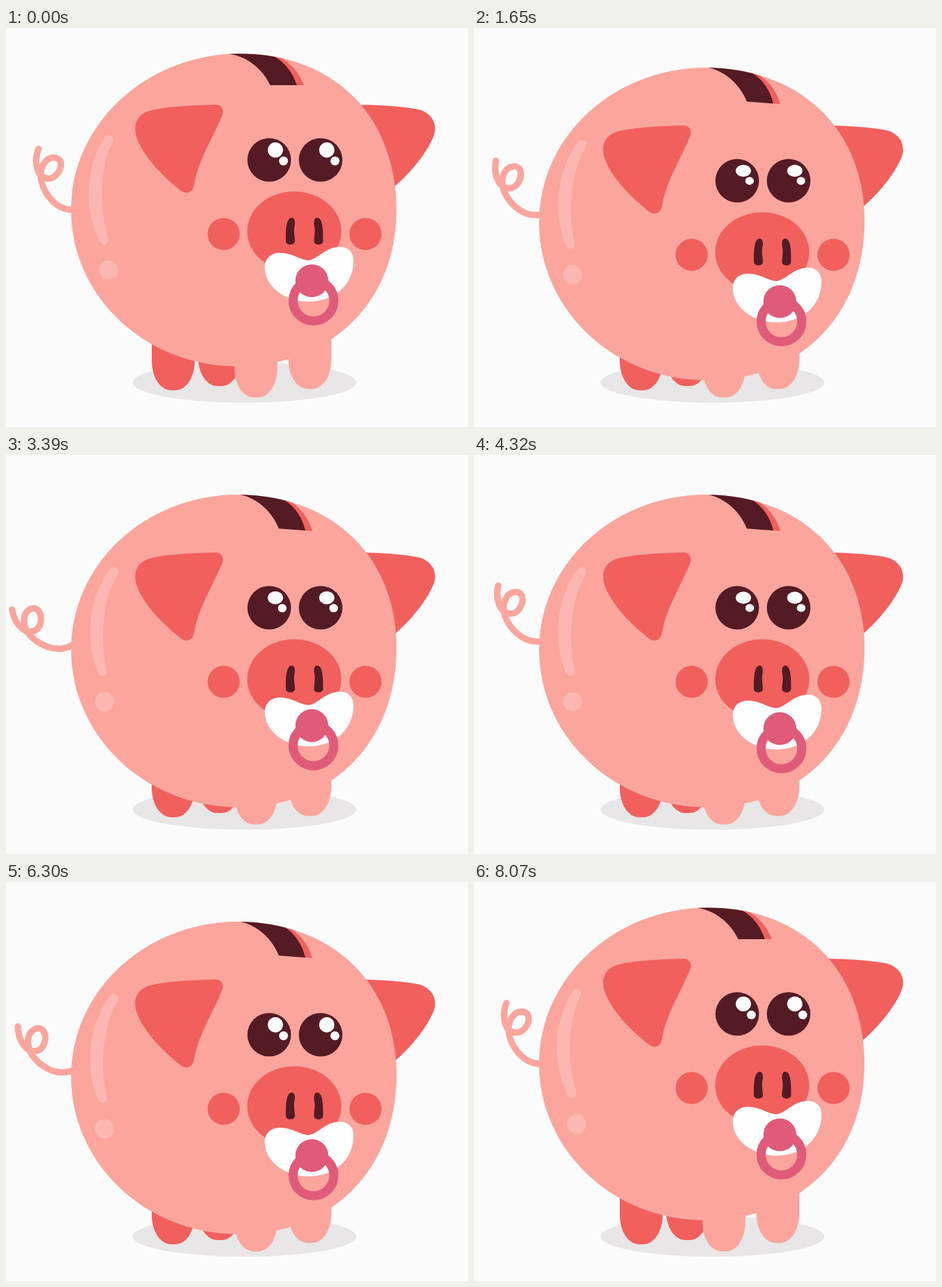
Recreate the animation shown at these times as an HTML page. Size 710 by 614 pixels, loop 8.1 s.

```html
<!DOCTYPE html>
<html lang="en">
<head>
<meta charset="utf-8">
<title>Piggy bank</title>
<style>
  html, body { margin: 0; width: 100%; height: 100%; overflow: hidden; background: #fbfbfb; }
  svg { display: block; width: 710px; height: 614px; }
  .skin { fill: #fba59d; }
  .red { fill: #f1605d; }
  .dark { fill: #541b24; }
  .white { fill: #fefefe; }
  .shine { fill: #fcb7b2; }
  .pink { fill: #e05b79; }
</style>
</head>
<body>
<svg viewBox="0 0 710 614">
  <defs>
    <path id="belly" d="M360 39.5 C504 39.5 600 136 600 280 C600 422 499 520.5 354 520.5 C214 520.5 100 412.8 100 280 C100 147.2 216.4 39.5 360 39.5Z"/>
    <clipPath id="bodyClip"><use href="#belly"/></clipPath>
    <path id="leg" d="M0 -100 V-46 C0 -20 13 0 30 0 H36 C53 0 66 -20 66 -46 V-100Z"/>
    <path id="nostril" d="M439 292 C444 292 445 299 443 307 C442 315 444 322 444 328 C444 335 430 335 430 328 C430 315 430 305 433 297 C435 293 437 292 439 292Z"/>
    <g id="eye">
      <circle class="dark" r="33.5"/>
      <ellipse class="white glintBig" cx="9.5" cy="-15.3" rx="11.7"/>
      <ellipse class="white glintSmall"/>
    </g>
  </defs>

  <ellipse cx="366.5" cy="545.5" rx="172" ry="31" fill="#e8e6e6"/>
  <use href="#leg" class="red" x="224" y="557.5"/>
  <use href="#leg" class="red" x="295" y="551"/>

  <g class="face">
    <path class="red" d="M535 118 C575 118 610 121 632 125 C656 130 664 150 657 167 C648 190 623 222 598 243 L535 220Z"/>
  </g>

  <g id="body">
    <path id="tail" fill="none" stroke="#fba59d" stroke-width="9.8" stroke-linecap="round"
      d="M50 186 C43 204 46 227 61 231 C75 235 86 218 84 207 C82 197 66 196 58 209 C47 226 57 250 69 263.5 C79 275 90 280 104 280 H122"/>
    <use href="#belly" class="skin"/>
    <g clip-path="url(#bodyClip)">
      <path class="red" d="M405 36 L421 45 C440 56 451 70 457.5 88 H445Z"/>
      <path class="dark" d="M340 39.5 C368 42 394 62 406 88 H447 C440 68 430 54 411 43 L405 30 H340Z"/>
    </g>
    <path class="shine" d="M152 167 C159 161 168 168 164 175 C145 210 142 275 157 322 C160 332 149 337 144 328 C120 280 121 215 152 167Z"/>
    <circle class="shine" cx="157.5" cy="372.5" r="14.8"/>
  </g>

  <use href="#leg" class="skin" x="351" y="568.5"/>
  <use href="#leg" class="skin" x="434" y="555.5"/>

  <g class="face">
    <path class="red" d="M320 118 C331 117 336 126 332 135 C315 175 295 205 289 241 C287 254 277 257 267 249 C237 225 210 195 201 169 C193 145 205 130 226 126 C255 120 290 119 320 118Z"/>
    <use href="#eye" x="404.5" y="203"/>
    <use href="#eye" x="483.5" y="203"/>
    <circle class="red" cx="334.5" cy="317" r="24.7"/>
    <circle class="red" cx="552.5" cy="317" r="24.7"/>
    <ellipse class="red" cx="443" cy="313" rx="72.3" ry="61.5"/>
    <use href="#nostril" class="dark"/>
    <use href="#nostril" class="dark" transform="translate(917.3 0) scale(-1 1)"/>
    <g id="pacifier">
      <path class="white" d="M464 357.5 C452 357 440 346 421 346 C404 346 396 358 398 373 C401 400 430 421 465 421 C505 421 534 395 534 358 C534 343 524 336 511 337 C490 338 478 357 464 357.5Z"/>
      <circle cx="472.5" cy="419.5" r="31.3" fill="none" stroke="#e05b79" stroke-width="14"/>
      <circle class="pink" cx="470" cy="389" r="25.3"/>
    </g>
  </g>
</svg>
<script>
  const LOOP = 8100, SUCK_CYCLE = 2700, SUCK_TIME = 1200;
  const $ = id => document.getElementById(id);
  const body = $('body'), tail = $('tail'), pacifier = $('pacifier');
  const faces = document.querySelectorAll('.face');
  const glintBig = document.querySelector('.glintBig');
  const glintSmall = document.querySelector('.glintSmall');

  // Swings 0 -> 1 -> 0 once per period
  const wave = (t, period) => (1 - Math.cos(2 * Math.PI * t / period)) / 2;

  const ease = (t, start, end) => {
    const p = Math.min(1, Math.max(0, (t - start) / (end - start)));
    return wave(p, 2);
  };

  const set = (el, attrs) => {
    for (const name in attrs) el.setAttribute(name, attrs[name]);
  };

  function draw(t) {
    const low = ease(t, 0, 600) - ease(t, 6900, 7500);
    set(body, { transform: `translate(0 ${21 * low}) rotate(${4 * low} 350 280)` });
    faces.forEach(face => set(face, { transform: `translate(0 ${32 * low})` }));

    set(tail, { transform: `rotate(${-34.2 * wave(t, 1350)} 117 285.5)` });

    const phase = t % SUCK_CYCLE;
    const suck = phase < SUCK_TIME ? wave(phase, 300) : 0;
    set(pacifier, { transform: `translate(0 ${-7 * suck})` });

    const squash = wave(t, 300);
    set(glintBig, { ry: 11.7 - 2.5 * squash });
    set(glintSmall, { cx: 22 - 3 * squash, cy: 1.6 - 1.3 * squash, rx: 6.9 - 0.3 * squash, ry: 6.9 - 0.8 * squash });
  }

  const start = performance.now();
  function tick() {
    draw((performance.now() - start) % LOOP);
    requestAnimationFrame(tick);
  }
  tick();
</script>
</body>
</html>
```
